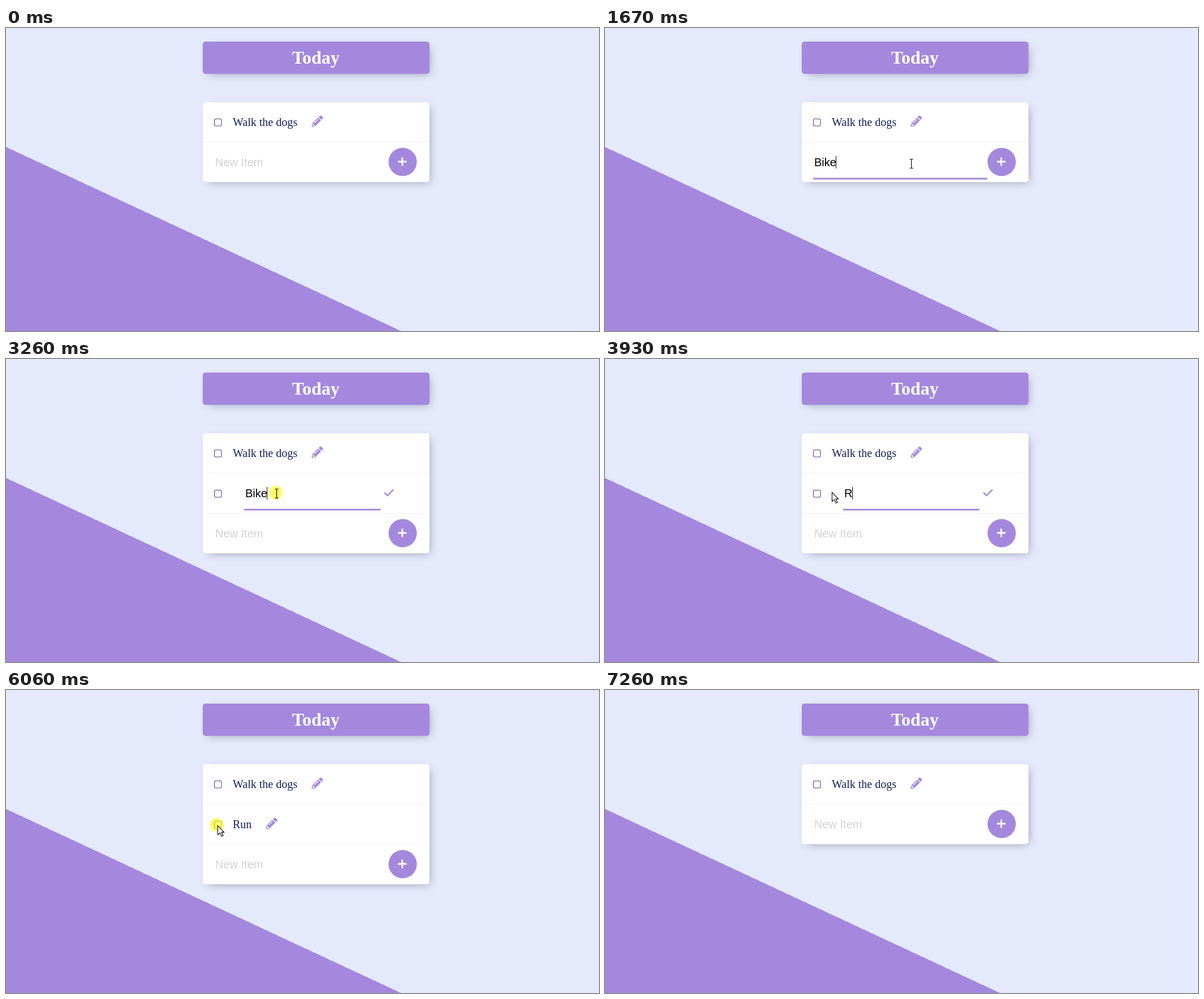
An HTML page with a canvas that plays this animation: 1046 px wide and 535 px high, repeating every 7.34 s.

```html
<!DOCTYPE html>
<html lang="en">
<head>
<meta charset="utf-8">
<title>Today</title>
<style>
  html, body { margin: 0; width: 100%; height: 100%; overflow: hidden; }
  body { background: linear-gradient(25deg, #a488dd 50%, #e4e9fc 50%) 0 0 / 1046px 908px no-repeat; }
  canvas { display: block; }
</style>
</head>
<body>
<canvas width="1046" height="535"></canvas>
<script>
const ctx = document.querySelector('canvas').getContext('2d');
const LOOP = 7340, STEP = 66.55;
const PURPLE = '#a488dd', ROW = 71, LIST_TOP = 131;
const SERIF = '20px "Liberation Serif", serif';
const SANS = '20px "Liberation Sans", sans-serif';

const PENCIL = new Path2D(
  'M498 142l-46 46q-9 9-17 0l-111-111q-8-8 0-17l46-46q34-28 68 0l60 60q28 34 0 68z' +
  'M284 100L22 362 0 484q0 28 28 28l122-22L412 228q9-9 0-17l-111-111q-9-8-17 0z' +
  'M124 340q-9-10 0-20l154-154q10-9 20 0 9 10 0 20l-154 154q-10 9-20 0z' +
  'M88 424h48v36l-64 12-31-31 11-65h36z');
const ARROW = new Path2D('M0 0V16L4 12.6 6.8 18.8 9.4 17.7 6.7 11.6H11.2Z');
const IBEAM = new Path2D('M-3 -8H-1Q0 -8 0 -7V7Q0 8 -1 8H-3M3 -8H1Q0 -8 0 -7M0 7Q0 8 1 8H3');
const TICK = new Path2D('M667.5 236L673 241 683.5 230.5');
const PLUS = new Path2D('M691.5 0H706.5M699 -7.5V7.5');

// Pointer stops: [step, x, y]
const ROUTE = [
  [1, 805, 515], [2, 700, 400], [3, 605, 305], [4, 555, 255], [5, 540, 239],
  [34, 540, 239], [35, 515, 237], [38, 474, 239], [42, 474, 239], [46, 477, 237],
  [49, 477, 237], [52, 400, 235], [80, 400, 235], [87, 373, 239], [96, 373, 239],
  [102, 535, 327], [103, 660, 405], [104, 872, 520]
];
const CLICKS = [[5, 7], [39, 41], [47, 52], [91, 94]];

const within = (n, from, to) => n >= from && n < to;

function pointerAt(n) {
  const i = ROUTE.findIndex(stop => stop[0] >= n);
  if (n < 1 || i < 0) return null;
  if (i === 0) return ROUTE[0].slice(1);
  const [a, ax, ay] = ROUTE[i - 1], [b, bx, by] = ROUTE[i];
  const k = (n - a) / (b - a);
  return [ax + (bx - ax) * k, ay + (by - ay) * k];
}

function text(str, x, y, font, color) {
  ctx.font = font;
  ctx.fillStyle = color;
  ctx.fillText(str, x, y);
  return x + ctx.measureText(str).width;
}

function rect(x, y, w, h, color) {
  ctx.fillStyle = color;
  ctx.fillRect(x, y, w, h);
}

function stroke(path, width, color) {
  ctx.lineWidth = width;
  ctx.strokeStyle = color;
  ctx.stroke(path);
}

function disc(x, y, r, color) {
  ctx.fillStyle = color;
  ctx.beginPath();
  ctx.arc(x, y, r, 0, 2 * Math.PI);
  ctx.fill();
}

function at(x, y, paint) {
  ctx.save();
  ctx.translate(x, y);
  paint();
  ctx.restore();
}

function card(y, h, color) {
  ctx.save();
  ctx.shadowColor = 'rgba(0,0,0,.3)';
  ctx.shadowBlur = 15;
  ctx.shadowOffsetX = ctx.shadowOffsetY = 5;
  rect(352, y + 5, 390, h - 10, color);
  ctx.restore();
  ctx.fillStyle = color;
  ctx.beginPath();
  ctx.roundRect(347, y, 400, h, 5);
  ctx.fill();
}

function row(top, label) {
  rect(347, top + 70, 400, 1, '#f1f1f1');
  const box = new Path2D();
  box.roundRect(367.5, top + 29.5, 12.5, 12.5, 2.5);
  stroke(box, 1.1, '#51458f');
  if (!label) return;
  const end = text(label, 400, top + 42, SERIF, '#13205c');
  at(end + 25.3, top + 23.5, () => {
    ctx.scale(20 / 512, 20 / 512);
    ctx.fillStyle = PURPLE;
    ctx.fill(PENCIL, 'evenodd');
  });
}

function field(x, width, top, value, { focus, caret, selected, hint }) {
  ctx.font = SANS;
  const w = ctx.measureText(value).width;
  if (selected) rect(x + 2 + w * (1 - selected), top + 24, w * selected, 23, '#0078d7');
  text(value || hint, x + 2, top + 42, SANS, value ? (selected === 1 ? '#fff' : '#000') : '#d2d2d4');
  if (focus) rect(x, top + 62.5, width, 3, PURPLE);
  if (caret) rect(Math.floor(x + 2 + w), top + 24, 1, 22, '#000');
}

function draw(n) {
  ctx.clearRect(0, 0, 1046, 535);
  const hasItem = within(n, 27, 94), editing = within(n, 41, 70);
  const rows = hasItem ? 2 : 1;
  const formTop = LIST_TOP + rows * ROW;

  card(24, 57, PURPLE);
  ctx.textAlign = 'center';
  text('Today', 546.5, 63, 'bold 32px "Liberation Serif", serif', '#fff');
  ctx.textAlign = 'left';

  card(LIST_TOP, rows * ROW + 70, '#fff');
  row(LIST_TOP, 'Walk the dogs');
  if (hasItem) row(LIST_TOP + ROW, editing ? '' : n < 70 ? 'Bike' : 'Run');

  if (editing) {
    const typed = n < 59 ? 'Bike' : 'Run'.slice(0, n < 63 ? 1 : n < 66 ? 2 : 3);
    field(420, 240.5, LIST_TOP + ROW, typed, {
      focus: n >= 47,
      caret: within(n, 47, 50) || n >= 59,
      selected: within(n, 50, 59) ? Math.min(1, (n - 49) / 2.5) : 0
    });
    stroke(TICK, 2.4, PURPLE);
  }

  const draft = n < 27 ? 'Bike'.slice(0, [17, 21, 24, 25].filter(k => n >= k).length) : '';
  field(367, 307.5, formTop, draft, {
    hint: 'New Item',
    focus: within(n, 6, 41) || within(n, 70, 91) || within(n, 94, 108),
    caret: within(n, 6, 14) || within(n, 17, 35) || within(n, 70, 78) ||
           within(n, 86, 91) || within(n, 94, 102)
  });
  disc(699.7, formTop + 34.5, 25, PURPLE);
  at(0, formTop + 34, () => stroke(PLUS, 2.8, '#fff'));

  const pointer = pointerAt(n);
  if (!pointer) return;
  const [x, y] = pointer;
  if (CLICKS.some(([from, to]) => within(n, from, to))) disc(x - 1.3, y - 1, 12, 'rgba(255,255,0,.58)');
  const inField = (left, right, top) => x > left && x < right && y > top + 4 && y < top + 66;
  const overText = inField(367, 674, formTop) || editing && inField(420, 660, LIST_TOP + ROW);
  at(Math.round(x) + .5, Math.round(y) + .5, () => {
    if (overText) return stroke(IBEAM, 1.1, '#000');
    ctx.fillStyle = '#fff';
    ctx.fill(ARROW);
    stroke(ARROW, 1.1, '#000');
  });
}

function tick() {
  draw(Math.floor(performance.now() % LOOP / STEP));
  requestAnimationFrame(tick);
}
tick();
</script>
</body>
</html>
```
